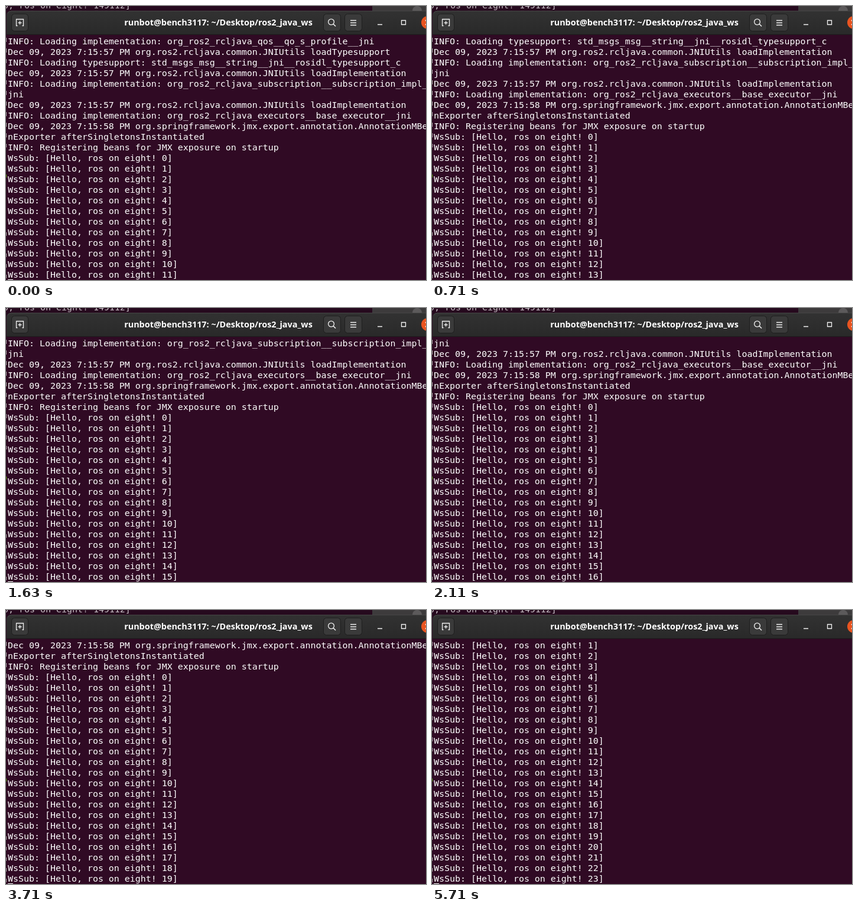
Animation, 711 px wide and 465 px high, one loop 5.91 s. Source, as an HTML page:

```html
<!DOCTYPE html>
<html lang="en">
<head>
<meta charset="utf-8">
<title>Terminal</title>
<style>
  html, body { margin: 0; width: 100%; height: 100%; overflow: hidden; background: #300a24; }
  #stage { position: relative; width: 711px; height: 465px; overflow: hidden; background: #260a1e; }
  #stage > * { position: absolute; }
  pre { margin: 0; font: 14.95px/18px "DejaVu Sans Mono", monospace; color: #fff; }
  #behind { left: -5px; top: -10px; color: #c6bec4; }
  #edge, #chrome { left: 0; top: 0; }
  #screen { left: 1px; top: 49px; width: 710px; height: 416px; overflow: hidden; background: #300a24; }
  #clip { position: absolute; left: 0; top: 2px; width: 710px; height: 414px; overflow: hidden; }
  #log { position: absolute; left: 2px; top: 0; }
  #cursor { left: 3px; top: 464px; width: 9px; height: 1px; background: #fff; }
</style>
</head>
<body>
<div id="stage">
  <pre id="behind">o, ros on eight! 149112]</pre>
  <div id="screen"><div id="clip"><pre id="log"></pre></div></div>
  <svg id="edge" width="2" height="465">
    <path d="M.5 54V240" stroke="#a99ca5" stroke-dasharray="7 11"/>
    <path d="M.5 384V462" stroke="#a99ca5" stroke-dasharray="6 12"/>
    <path d="M.5 286v5" stroke="#4e9a06"/>
  </svg>
  <svg id="chrome" width="711" height="50" fill="none">
    <defs>
      <linearGradient id="bar" x2="0" y2="1">
        <stop stop-color="#323232"/><stop offset="1" stop-color="#292929"/>
      </linearGradient>
    </defs>
    <path d="M620 0H711V9H620Z" fill="#3d3b3c"/>
    <circle cx="696" cy="8" r="8" fill="#5c5a5b"/>
    <path d="M1 49V16Q1 8 9 8H711V49Z" fill="url(#bar)"/>
    <path d="M3 12.5Q5 8.5 9 8.5H711" stroke="#454545"/>
    <path d="M1 48.5H711" stroke="#1b1b1b"/>
    <g fill="#3a3a3a" stroke="#1e1e1e">
      <rect x="9.5" y="13.5" width="28" height="29" rx="5"/>
      <rect x="537.5" y="13.5" width="29" height="29" rx="5"/>
      <rect x="573.5" y="13.5" width="29" height="29" rx="5"/>
    </g>
    <g stroke="#f2f2f2" stroke-width="1.3">
      <path d="M19.5 22.5H17.5V33.5H19.5M27.5 22.5H29.5V33.5H27.5M19.5 22.5H27.5M23.5 25.5V31.5M20.5 28.5H26.5"/>
      <circle cx="550.5" cy="27" r="4.9"/>
      <path d="M554 30.5L558 34.5" stroke-width="1.6"/>
      <path d="M583 24.5H593M583 28.5H593M583 32.5H593"/>
      <path d="M629 31.5H637M669.5 24.5H676.5V31.5H669.5Z"/>
    </g>
    <circle cx="714" cy="28" r="11" fill="#e95420"/>
    <path d="M710 24L718 32M718 24L710 32" stroke="#fff" stroke-width="1.4"/>
    <text x="359.5" y="33" text-anchor="middle" fill="#fff" font-family="Open Sans, sans-serif"
      font-size="14.4" font-weight="700">runbot@bench3117: ~/Desktop/ros2_java_ws</text>
  </svg>
  <div id="cursor"></div>
</div>
<script>
  const LOOP = 5910, ROW = 18;
  const scrollTimes = [200, 710, 1110, 1630, 2110, 2630, 3150, 3710, 4310, 4690, 5210, 5710];
  const blinkTimes = [510, 1110, 1830, 2310, 2910, 3510, 4110, 4890];

  const load = (second, method) =>
    `Dec 09, 2023 7:15:${second} PM org.ros2.rcljava.common.JNIUtils ${method}`;
  const impl = name => `INFO: Loading implementation: org_ros2_rcljava_${name}`;

  const startup = [
    impl("qos__qo_s_profile__jni"),
    load(57, "loadTypesupport"),
    "INFO: Loading typesupport: std_msgs_msg__string__jni__rosidl_typesupport_c",
    load(57, "loadImplementation"),
    impl("subscription__subscription_impl_"),
    "jni",
    load(57, "loadImplementation"),
    impl("executors__base_executor__jni"),
    "Dec 09, 2023 7:15:58 PM org.springframework.jmx.export.annotation.AnnotationMBe",
    "nExporter afterSingletonsInstantiated",
    "INFO: Registering beans for JMX exposure on startup"
  ];
  const messages = Array.from({ length: 24 }, (_, i) => `WsSub: [Hello, ros on eight! ${i}]`);

  const log = document.getElementById("log");
  const cursor = document.getElementById("cursor");
  log.textContent = [...startup, ...messages].join("\n");

  const countPassed = (times, t) => times.filter(time => time <= t).length;
  const start = performance.now();

  function draw(now) {
    const t = Math.max(0, now - start) % LOOP;
    log.style.top = -ROW * countPassed(scrollTimes, t) + "px";
    cursor.style.visibility = countPassed(blinkTimes, t) % 2 ? "hidden" : "visible";
    requestAnimationFrame(draw);
  }
  draw(start);
</script>
</body>
</html>
```
